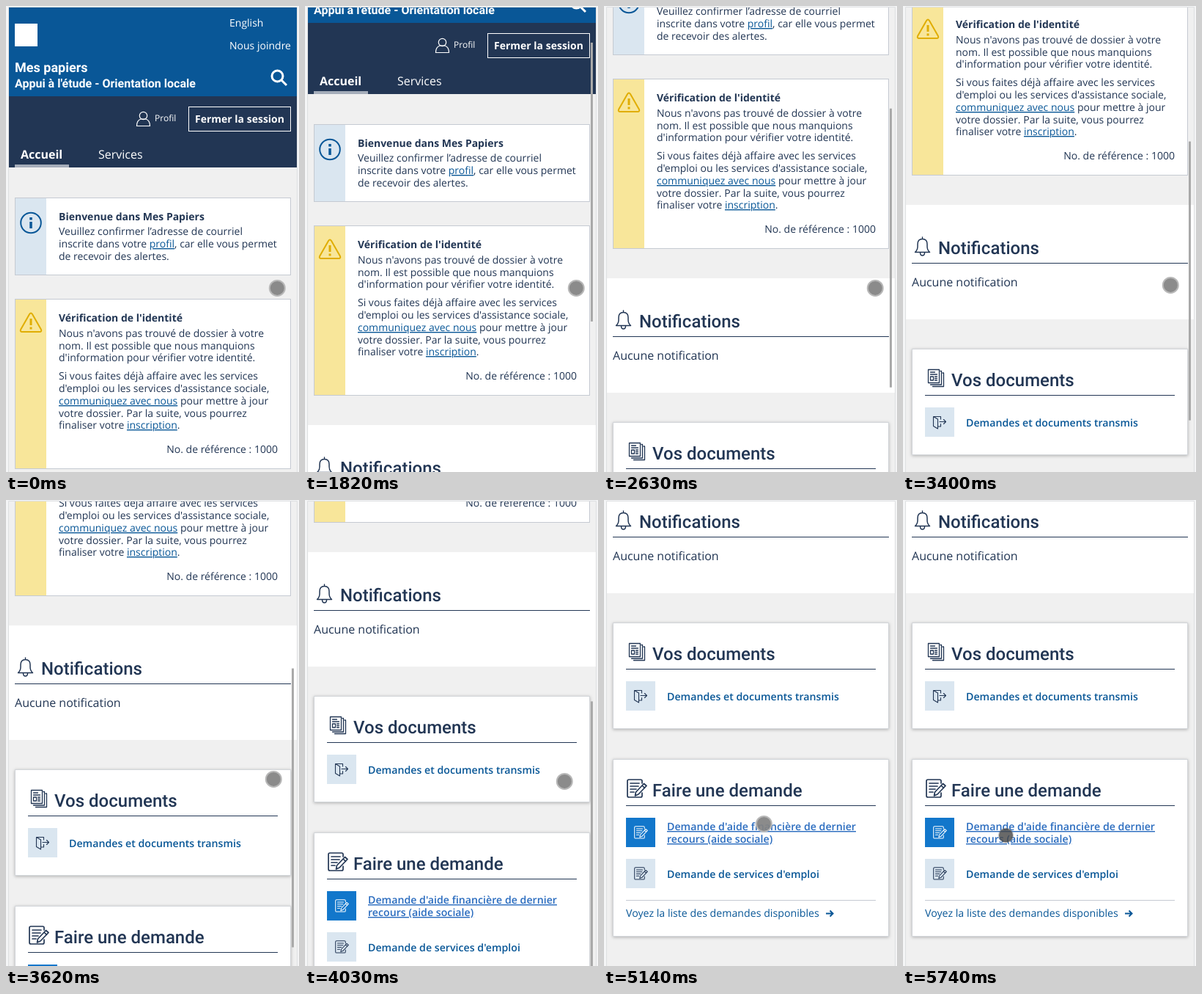
Write an HTML page that moves like this. It is 400 px wide and 635 px high and loops after 7630 ms.

```html
<!DOCTYPE html>
<html lang="fr">
<head>
<meta charset="utf-8">
<style>
  html, body { margin: 0; width: 100%; height: 100%; overflow: hidden; background: #f4f5f6; }
  svg { display: block; }
  text { font: 14px "Open Sans", sans-serif; fill: #223654; white-space: pre; text-rendering: geometricPrecision; }
  .b { font-weight: 700; }
  .s { font-weight: 600; font-size: 14.2px; fill: #095797; }
  .m { font-size: 16px; }
  .h { font: 500 24px Roboto, sans-serif; }
  .w { fill: #fff; }
  .a { fill: #095797; text-decoration: underline; }
  .hot { font-weight: 600; font-size: 14.2px; fill: #2a6cbf; text-decoration: underline; }
  .box { fill: #fff; stroke: #c5cad2; }
  .card { fill: #fff; stroke: #d3d6da; filter: drop-shadow(0 1px 2px #0004); }
  .i { fill: none; stroke: #223654; stroke-width: 1.5; stroke-linecap: round; stroke-linejoin: round; }
  .rule { stroke: #223654; }
  .tile { fill: #dae6f0; }
</style>
</head>
<body>
<svg width="400" height="635">
  <defs>
    <g id="note">
      <path d="M21 6V3q0-2-2-2H3Q1 1 1 3v20q0 2 2 2h16q2 0 2-2v-4M5 6h12M5 10h11M5 14h8M5 18h5"/>
      <path d="M23.500 6.500l3.500 3-11 11.500-4.500 2 1-5zM21 9l3.500 3.300"/>
    </g>
  </defs>
  <path d="M3.500 635V1.500h394V635" fill="#fff" stroke="#dddfe1"/>
  <svg x="4" y="2" width="393" height="633" viewBox="4 2 393 633">
    <rect x="4" y="2" width="393" height="633" fill="#f0f0f0"/>
    <g id="page">
      <!-- header -->
      <rect x="4" y="2" width="393" height="121" fill="#095797"/>
      <rect x="4" y="123" width="393" height="97" fill="#223654"/>
      <rect x="12" y="24" width="31" height="31" fill="#fff"/>
      <text class="w" x="305" y="28">English</text>
      <text class="w" x="305" y="59">Nous joindre</text>
      <text class="w" x="12" y="90" style="font:700 18px Roboto,sans-serif">Mes papiers</text>
      <text class="w" x="12" y="111" style="font:700 16px Roboto,sans-serif">Appui à l'étude - Orientation locale</text>
      <g fill="none" stroke="#fff">
        <g stroke-width="3"><circle cx="370.500" cy="95.500" r="7.500"/><path d="M376 101l7 7"/></g>
        <g stroke-width="1.200">
          <circle cx="187.500" cy="149.500" r="5.200"/>
          <path d="M178.500 163.500q0-8 6-9.500h6q6 1.500 6 9.500z"/>
        </g>
        <rect x="249.500" y="137.500" width="139" height="33"/>
      </g>
      <text class="w" x="203" y="157" style="font-size:12px">Profil</text>
      <text class="w b" x="258" y="159">Fermer la session</text>
      <text class="w b m" x="20" y="208">Accueil</text>
      <text class="w m" x="126" y="208">Services</text>
      <rect x="12" y="216" width="74" height="4" fill="#a5adba"/>

      <!-- welcome -->
      <rect class="box" x="12.500" y="261.500" width="376" height="105"/>
      <rect class="tile" x="13" y="262" width="42" height="104"/>
      <circle cx="34" cy="295.500" r="13.800" fill="none" stroke="#095797" stroke-width="2"/>
      <path d="M34 288v3.500M34 294v9" stroke="#095797" stroke-width="3.500"/>
      <text class="b" x="72" y="292">Bienvenue dans Mes Papiers</text>
      <text x="72" y="312">Veuillez confirmer l’adresse de courriel</text>
      <text x="72" y="329">inscrite dans votre <tspan class="a">profil</tspan>, car elle vous permet</text>
      <text x="72" y="346">de recevoir des alertes.</text>

      <!-- identity -->
      <rect class="box" x="12.500" y="399.500" width="376" height="231"/>
      <rect x="13" y="400" width="42" height="230" fill="#f8e69a"/>
      <g fill="none" stroke="#e0ad03" stroke-width="2" stroke-linejoin="round">
        <path d="M32 420q2-3 4 0l12 21q1 3-2 3H22q-3 0-2-3z"/>
        <path d="M34 426v9M34 437.500v3" stroke-width="3"/>
      </g>
      <text class="b" x="72" y="430">Vérification de l'identité</text>
      <text x="72" y="451">Nous n'avons pas trouvé de dossier à votre</text>
      <text x="72" y="468">nom. Il est possible que nous manquions</text>
      <text x="72" y="484">d'information pour vérifier votre identité.</text>
      <text x="72" y="509">Si vous faites déjà affaire avec les services</text>
      <text x="72" y="526">d'emploi ou les services d'assistance sociale,</text>
      <text x="72" y="543"><tspan class="a">communiquez avec nous</tspan> pour mettre à jour</text>
      <text x="72" y="560">votre dossier. Par la suite, vous pourrez</text>
      <text x="72" y="576">finaliser votre <tspan class="a">inscription</tspan>.</text>
      <text x="371" y="609" text-anchor="end">No. de référence : 1000</text>

      <!-- notifications -->
      <rect x="4" y="671" width="393" height="156" fill="#fff"/>
      <path class="i" d="M16.500 735.500q3.500-3 3.500-8v-3q0-7 6.500-7t6.500 7v3q0 5 3.500 8zM26.500 717v-2M23.500 736q0 4 3 4t3-4"/>
      <text class="h" x="48" y="738">Notifications</text>
      <path class="rule" d="M12 750.500h377"/>
      <text class="m" x="12" y="782">Aucune notification</text>

      <!-- documents -->
      <rect class="card" x="12.500" y="867.500" width="376" height="144"/>
      <g class="i" style="stroke-width:1.300">
        <path d="M34.500 895.500h15v18h-15zM51 897.500h1.500v18.500H37.500M54 900h1.500v18.500H40.500"/>
        <path d="M37.500 899h6M37.500 902h9M37.500 905h4v5h-4zM43.500 905h3M43.500 907.500h3M43.500 910h3"/>
      </g>
      <text class="h" x="66" y="918">Vos documents</text>
      <path class="rule" d="M30 930.500h341"/>
      <rect class="tile" x="30" y="947" width="40" height="40"/>
      <path class="i" style="stroke-width:1.100" d="M51.500 963v-3.500h-10v13l6 3.500v-13l-6-3.500M48 973h3.500v-3.500M50 966.500h8M55.500 963.500l3 3-3 3"/>
      <text class="s" x="86" y="973">Demandes et documents transmis</text>

      <!-- requests -->
      <rect class="card" x="12.500" y="1053.500" width="376" height="241"/>
      <use href="#note" class="i" x="31" y="1080" style="stroke-width:1.700"/>
      <text class="h" x="66" y="1104">Faire une demande</text>
      <path class="rule" d="M30 1116.500h341"/>
      <rect x="30" y="1133" width="40" height="40" fill="#1277cb"/>
      <use href="#note" class="i" transform="translate(41 1144) scale(.68)" style="stroke:#fff"/>
      <text class="hot" x="86" y="1150">Demande d'aide financière de dernier</text>
      <text class="hot" x="86" y="1167">recours (aide sociale)</text>
      <rect class="tile" x="30" y="1189" width="40" height="40"/>
      <use href="#note" class="i" transform="translate(41 1200) scale(.68)"/>
      <text class="s" x="86" y="1215">Demande de services d'emploi</text>
      <path d="M30 1245.500h341" stroke="#c5cad2"/>
      <text class="s" x="30" y="1268" style="font-weight:400">Voyez la liste des demandes disponibles</text>
      <path d="M303 1263.500h9M308.500 1259.500l4 4-4 4" fill="none" stroke="#095797" stroke-width="2"/>
    </g>
    <rect id="bar" x="390" width="3" height="380" fill="#a9a9a9"/>
  </svg>
  <circle id="dot" r="10.500" stroke-width="2"/>
</svg>
<script>
const LOOP = 7630, TICK = 65.8, PRESS = 5740;
const jumps = [1820, 2230, 2540, 3160, 3620, 3930, 4220];  // each scrolls by 100 px
const path = [  // time, x, y
  [3160, 370.3, 384.4], [3400, 365.3, 380.4], [3930, 365.3, 380.4], [4030, 354.3, 383.4],
  [4620, 326.3, 401.4], [4680, 323.5, 402.5], [4950, 277, 417], [5380, 150, 470],
  [5440, 145.5, 464], [5500, 148.5, 453], [5740, 140.5, 457]
];
const [page, bar, dot] = ['page', 'bar', 'dot'].map(id => document.getElementById(id));
const set = (el, attrs) => { for (const k in attrs) el.setAttribute(k, attrs[k]); };

function pointer(t) {
  if (t >= 4020) t = 4030 + TICK * Math.floor((t - 4020) / TICK);
  const i = path.findIndex(p => p[0] > t);
  if (i < 1) return path[i ? path.length - 1 : 0].slice(1);
  const [a, b] = [path[i - 1], path[i]], u = (t - a[0]) / (b[0] - a[0]);
  return [1, 2].map(k => a[k] + (b[k] - a[k]) * u);
}

function draw(t) {
  const scroll = 100 * jumps.filter(j => t >= j).length;
  const barOn = t >= 1820 && t < 3000 || t >= 3160 && t < 4680;
  const [x, y] = pointer(t), down = t >= PRESS;
  set(page, { transform: `translate(0 ${-scroll})` });
  set(bar, { y: 5 + scroll * .449, opacity: +barOn });
  set(dot, {
    cx: x, cy: y, r: down ? 9.5 : 10.5,
    fill: down ? '#444c' : '#838383ee',
    stroke: down ? '#6666' : '#b8b8b8'
  });
}

const start = performance.now();
(function frame() {
  draw((performance.now() - start) % LOOP);
  requestAnimationFrame(frame);
})();
</script>
</body>
</html>
```
